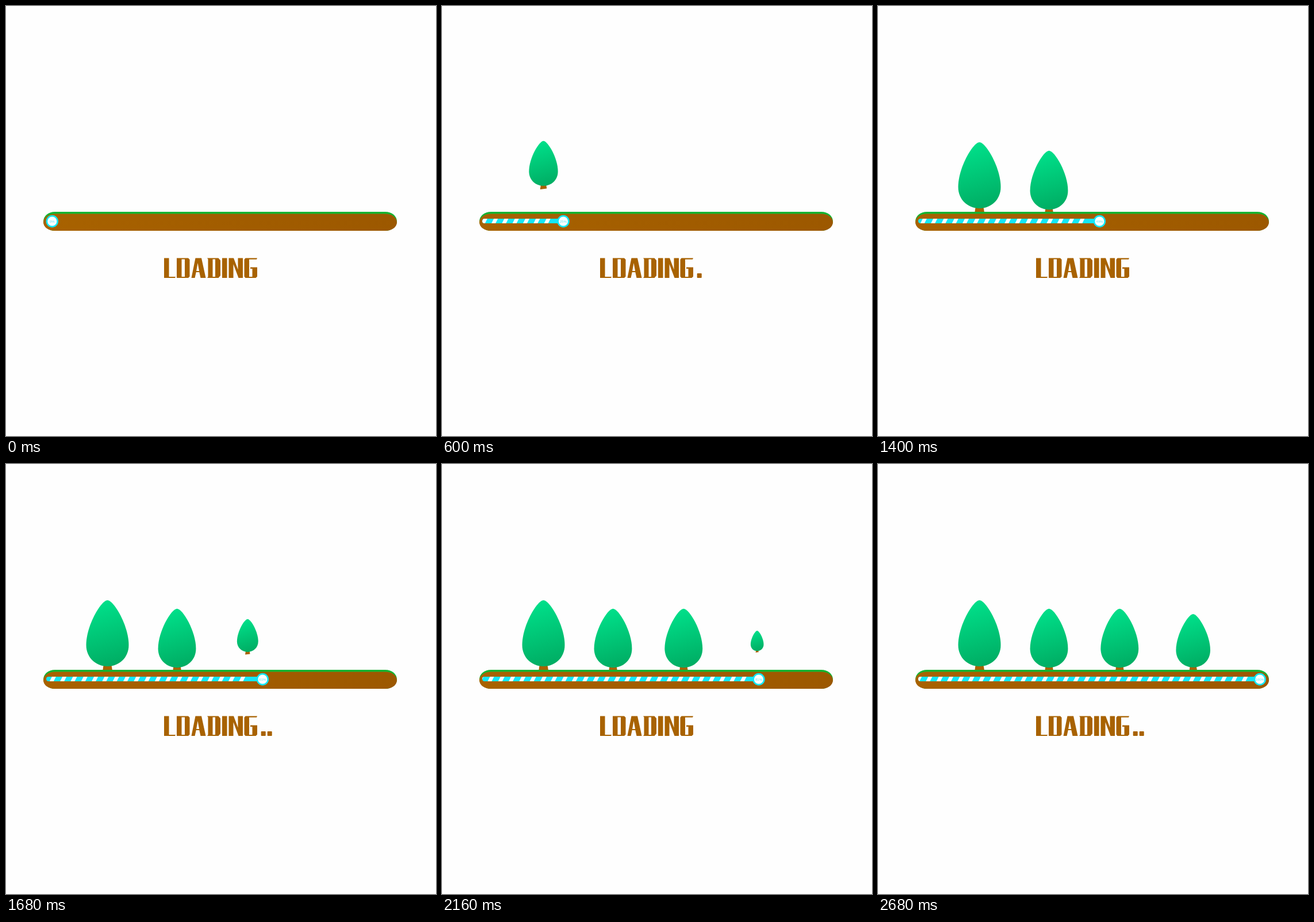
Recreate the animation shown at these times as an HTML page with a canvas. Size 748x748 px, loop 2.72 s.

```html
<!DOCTYPE html>
<html lang="en">
<head>
<meta charset="utf-8">
<title>Loading</title>
<style>
  html, body { margin: 0; width: 100%; height: 100%; overflow: hidden; background: #fefefe; }
  canvas { display: block; width: 748px; height: 748px; }
</style>
</head>
<body>
<canvas id="stage" width="748" height="748" role="img" aria-label="Loading"></canvas>
<script>
const ctx = document.getElementById('stage').getContext('2d');
const LOOP = 2720, STEP = 40, GROW = 500, DOT_TIME = 116.6;
const CYAN = '#12e8fa', BROWN = '#a86200';

// hop is the jump height, bend shifts the jump later in the growth
const trees = [
  { x: 176.5, y: 299, size: 1, start: 260, hop: 27, bend: 0.95 },
  { x: 297.5, y: 307, size: 0.89, start: 820, hop: 16, bend: 3.5 },
  { x: 420.3, y: 307, size: 0.89, start: 1400, hop: 16, bend: 3.5 },
  { x: 548.2, y: 311, size: 0.805, start: 1970, hop: 19, bend: 3.5 }
];

const percentKeys = [[0, 0], [600, 25], [1000, 36], [1400, 49], [1960, 73], [2360, 88], [2680, 100]];

const lettering = new Path2D(`
  M275 438.5h8.5v32.5h11.5l-1 2h-19z
  M297 438.5h20l2.5 2.5v29.5l-2.5 2.5h-20z M305.5 440.5v30.5h5.5v-30.5z
  M329.5 438.5h10.5l7.5 34.5h-9l-2.2-10h-5.6l-2.2 10h-6z M333.5 447l-2.4 14h5z
  M350 438.5h19.5l3.5 4v26.5l-3.5 4h-19.5l1.5-2v-30.5z M359.5 440.5v30.5h4.5v-30.5z
  M376 438.5h8.5v34.5h-8.5z
  M387.5 438.5h8.5l7.5 20v-20h8.5v34.5h-7.5l-9-24v24h-8z
  M416.5 438.5h20.5l-1 2.3h-13v30.2h5.5v-14h-3.5v-2.5h12v16l-2.5 2.5h-18l-2-2.5v-29.5z`);

const leaf = new Path2D('M0-62C11-62 37-18 37 16C37 38 20 53 0 53C-20 53-37 38-37 16C-37-18-11-62 0-62Z');
const trunk = new Path2D('M-6.5 48H6.5L8.5 60Q0 61-8.5 62Z');

const leafFill = gradient(-18, -58, 14, 54, '#00e08a', '#00ab62');
const barFill = gradient(65, 0, 680, 0, '#a86200', '#9c5800');

function gradient(x0, y0, x1, y1, from, to) {
  const fill = ctx.createLinearGradient(x0, y0, x1, y1);
  fill.addColorStop(0, from);
  fill.addColorStop(1, to);
  return fill;
}

function pill(x, y, w, h, rx, ry, fill) {
  ctx.beginPath();
  ctx.roundRect(x, y, w, h, { x: rx, y: ry });
  ctx.fillStyle = fill;
  ctx.fill();
}

function percentAt(t) {
  const i = Math.max(1, percentKeys.findIndex(([time]) => time >= t));
  const [t0, p0] = percentKeys[i - 1], [t1, p1] = percentKeys[i];
  return Math.round(p0 + (p1 - p0) * (t - t0) / (t1 - t0));
}

function drawTree(tree, t) {
  const grown = Math.min(1, (t - tree.start) / GROW);
  if (grown <= 0) return;
  const lift = tree.hop * Math.sin(Math.PI * grown ** tree.bend);
  ctx.save();
  ctx.translate(tree.x, tree.y - lift);
  ctx.scale(grown * tree.size, grown * tree.size);
  ctx.fillStyle = BROWN;
  ctx.fill(trunk);
  ctx.fillStyle = leafFill;
  ctx.fill(leaf);
  ctx.restore();
}

function drawProgress(t) {
  const x = 80.3 + 0.2179 * t;
  ctx.save();
  ctx.beginPath();
  ctx.roundRect(70, 370, x - 70, 8, 4);
  ctx.clip();
  ctx.fillStyle = CYAN;
  ctx.fillRect(70, 370, x - 70, 8);
  ctx.fillStyle = '#fff';
  for (let s = 50.5 + 0.0075 * t; s < x - 18; s += 18.3) {
    ctx.beginPath();
    ctx.moveTo(s - 5.5, 378);
    ctx.lineTo(s - 1.5, 370);
    ctx.lineTo(s + 5.5, 370);
    ctx.lineTo(s + 1.5, 378);
    ctx.fill();
  }
  ctx.restore();

  ctx.beginPath();
  ctx.arc(x, 374.5, 9.4, 0, 2 * Math.PI);
  ctx.fillStyle = '#fff';
  ctx.fill();
  ctx.lineWidth = 2.7;
  ctx.strokeStyle = CYAN;
  ctx.stroke();
  ctx.fillStyle = '#5be4f2';
  ctx.font = '6px Arial, "Liberation Sans", sans-serif';
  ctx.textAlign = 'center';
  ctx.fillText(percentAt(t) + '%', x, 376.7);
}

function drawLabel(t) {
  ctx.fillStyle = BROWN;
  ctx.fill(lettering, 'evenodd');
  const phase = Math.floor(t / DOT_TIME) % 6;
  const dots = Math.min(phase, 6 - phase);
  for (let i = 0; i < dots; i++) pill(443.7 + 11 * i, 465, 8, 8, 1, 1, BROWN);
}

function draw(now) {
  const t = Math.floor(now % LOOP / STEP) * STEP;
  ctx.fillStyle = '#fefefe';
  ctx.fillRect(0, 0, 748, 748);
  trees.forEach(tree => drawTree(tree, t));
  pill(65, 358, 615, 33, 20, 16.5, '#14b432');
  pill(65, 361.5, 615, 29.5, 20, 14.75, barFill);
  drawProgress(t);
  drawLabel(t);
  requestAnimationFrame(frame);
}

let begin;
function frame(now) {
  begin ??= now;
  draw(now - begin);
}
requestAnimationFrame(frame);
</script>
</body>
</html>
```
